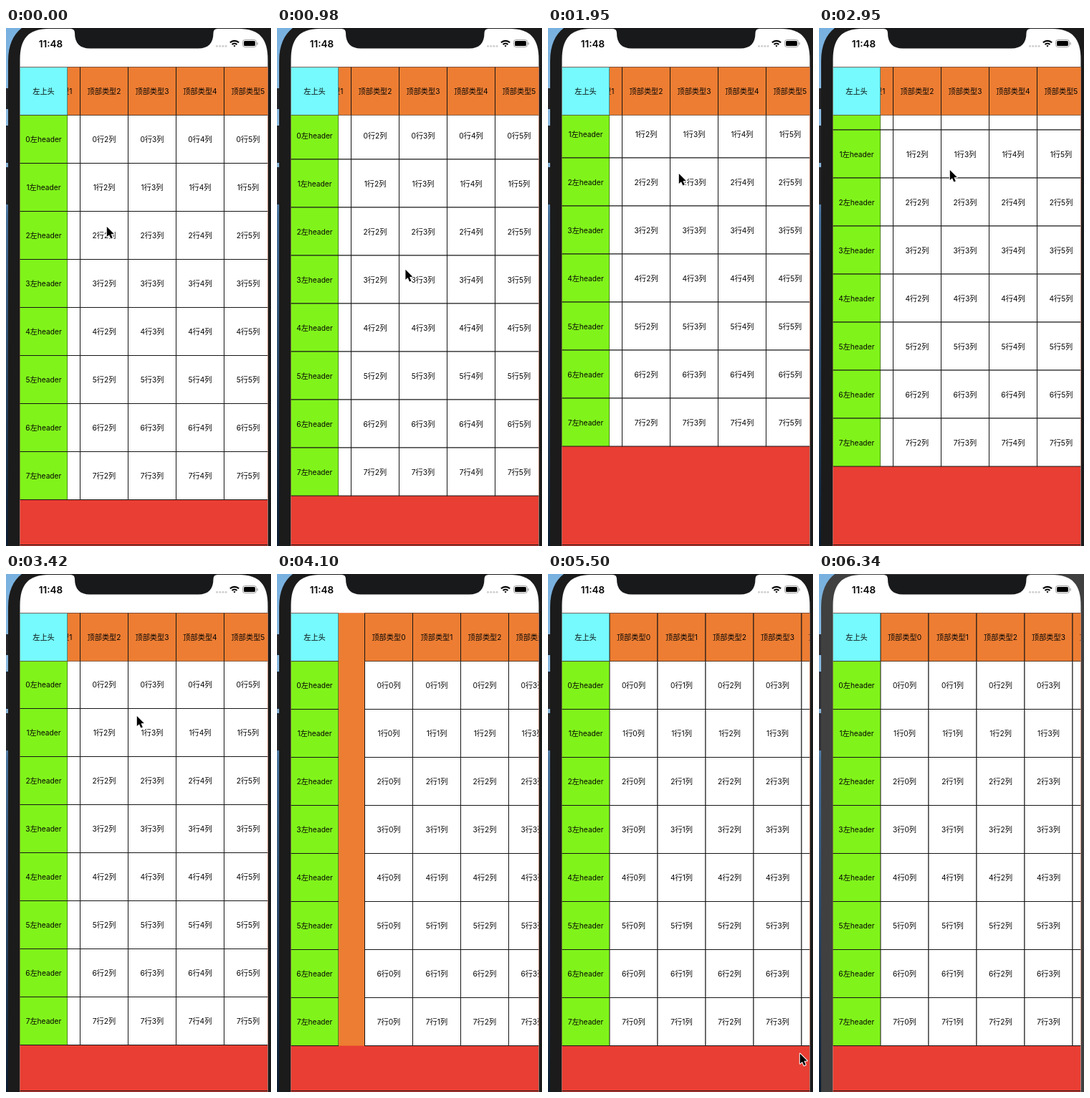
Write an HTML page with a canvas that moves like this. It is 370 px wide and 722 px high and loops after 6.44 s.

```html
<!DOCTYPE html>
<html lang="zh-CN">
<head>
<meta charset="utf-8">
<style>
html, body { margin: 0; width: 100%; height: 100%; overflow: hidden; background: #1a1a1a; }
canvas { display: block; }
</style>
</head>
<body>
<canvas id="stage" width="370" height="722"></canvas>
<script>
const ctx = document.getElementById('stage').getContext('2d');
const LOOP = 6440, W = 370, H = 722, CELL = 67, ROWS = 8, COLS = 7;
const LEFT = 19, TOP = 54.5, BODY_X = LEFT + CELL, BODY_Y = TOP + CELL;
const SCREEN_L = 19.5, SCREEN_R = 365.5;
const FONT = 'Inter, "Noto Sans CJK SC", "Noto Sans CJK", sans-serif';
const ORANGE = '#ed7d32', INK = '#161616';

const ramp = (t, from, to) => Math.min(1, Math.max(0, (t - from) / (to - from)));
const half = v => Math.round(v * 2) / 2;

// Critically damped return to rest
function bounce(size, elapsed) {
  const w = elapsed * 0.0109;
  return size * (1 + w) * Math.exp(-w);
}

function pointerAt(t) {
  if (t > 5100) {
    const away = 1 - ramp(t, 5140, 5260);
    return [351 + 46 * away ** 2, 608 - 62 * away + 118 * ramp(t, 5380, 5620)];
  }
  return [
    140 + 33 * ramp(t, 370, 450) + 9 * ramp(t, 450, 1300) + 217 * ramp(t, 3600, 4030),
    276 + 89 * ramp(t, 370, 450) - 163 * ramp(t, 770, 1950) - 5 * ramp(t, 1950, 2300)
  ];
}

// Pulled past the edge at about half the pointer's speed, then released
function scrollY(t, y) {
  if (t < 770) return 0;
  return half(t < 2950 ? 0.515 * Math.max(0, 347 - y) : bounce(77.5, t - 2825));
}

function scrollX(t) {
  return half(t < 4030 ? 116.5 - 161 * ramp(t, 3600, 4030) : -bounce(44.5, t - 4030));
}

function rect(color, x, y, w, h) {
  ctx.fillStyle = color;
  ctx.fillRect(x, y, w, h);
}

function clipped(x, y, w, h, draw) {
  ctx.save();
  ctx.beginPath();
  ctx.rect(x, y, w, h);
  ctx.clip();
  draw();
  ctx.restore();
}

function text(label, x, y, font) {
  ctx.fillStyle = '#050505';
  ctx.font = font + ' ' + FONT;
  ctx.textAlign = 'center';
  ctx.fillText(label, x, y);
}

function cell(color, x, y, label) {
  rect(color, x, y, CELL, CELL);
  ctx.strokeStyle = INK;
  ctx.lineWidth = 1;
  ctx.strokeRect(x, y, CELL, CELL);
  text(label, x + CELL / 2, y + CELL / 2 + 4, '10.2px');
}

function table(sx, sy) {
  const bodyW = SCREEN_R - BODY_X, bodyH = H - BODY_Y;
  const colX = c => BODY_X + c * CELL - sx, rowY = r => BODY_Y + r * CELL - sy;
  rect('#e93e33', LEFT, TOP, SCREEN_R - LEFT, H - TOP);
  rect(INK, LEFT, 720, SCREEN_R - LEFT, 1);
  rect(ORANGE, BODY_X, TOP, bodyW, rowY(ROWS) - TOP);

  clipped(BODY_X, BODY_Y, bodyW, bodyH, () => {
    for (let r = 0; r < ROWS; r++)
      for (let c = 0; c < COLS; c++) cell('#fff', colX(c), rowY(r), `${r}行${c}列`);
  });
  clipped(BODY_X, TOP, bodyW, CELL, () => {
    for (let c = 0; c < COLS; c++) cell(ORANGE, colX(c), TOP, '顶部类型' + c);
  });
  clipped(LEFT, BODY_Y, CELL, bodyH, () => {
    for (let r = 0; r < ROWS; r++) cell('#80f41a', LEFT, rowY(r), r + '左header');
  });
  clipped(LEFT, TOP, CELL, CELL, () => cell('#76fafd', LEFT, TOP, '左上头'));
}

function backdrop(lit) {
  const sky = ctx.createLinearGradient(0, 0, 0, H);
  sky.addColorStop(0, '#78b1e0');
  sky.addColorStop(0.25, '#8db9dc');
  sky.addColorStop(0.36, '#456f99');
  sky.addColorStop(1, '#0b1c30');
  rect(sky, 0, 0, 40, H);

  const button = lit ? '#303238' : '#242529';
  rect(button, 0, 84, 4, 29);
  rect(button, 0, 136, 4, 52);
  rect(button, 0, 194, 4, 52);

  ctx.fillStyle = lit ? '#404040' : '#1b1b1b';
  ctx.beginPath();
  ctx.moveTo(3, H);
  ctx.lineTo(3, 46);
  ctx.bezierCurveTo(3, 24, 10, 9, 22, 0);
  ctx.lineTo(W, 0);
  ctx.lineTo(W, H);
  ctx.fill();
}

function screenPath() {
  ctx.beginPath();
  ctx.moveTo(SCREEN_L, H);
  ctx.lineTo(SCREEN_L, 44);
  ctx.bezierCurveTo(SCREEN_L, 15, 31, 1, 60, 1);
  ctx.lineTo(325, 1);
  ctx.bezierCurveTo(354, 1, SCREEN_R, 15, SCREEN_R, 44);
  ctx.lineTo(SCREEN_R, H);
  ctx.closePath();
}

function notch() {
  ctx.fillStyle = '#18191b';
  ctx.beginPath();
  ctx.moveTo(90, 1);
  ctx.quadraticCurveTo(96, 1, 96, 7);
  ctx.bezierCurveTo(96, 21, 103, 28.5, 117, 28.5);
  ctx.lineTo(268.5, 28.5);
  ctx.bezierCurveTo(282.5, 28.5, 289.5, 21, 289.5, 7);
  ctx.quadraticCurveTo(289.5, 1, 295.5, 1);
  ctx.fill();
}

function statusBar() {
  text('11:48', 62.5, 26.5, '600 13.5px');

  ctx.fillStyle = '#cfcfcf';
  for (let i = 0; i < 4; i++) {
    ctx.beginPath();
    ctx.arc(294.5 + i * 4.2, 25.2, 1.5, 0, 7);
    ctx.fill();
  }

  ctx.strokeStyle = '#000';
  ctx.lineWidth = 2.2;
  for (let r = 1.1; r < 9; r += 3.75) {
    ctx.beginPath();
    ctx.arc(319, 26.4, r, -Math.PI * 0.75, -Math.PI * 0.25);
    ctx.stroke();
  }

  ctx.strokeStyle = '#9c9c9c';
  ctx.lineWidth = 1;
  ctx.beginPath();
  ctx.roundRect(330.5, 16.5, 19, 10, 3);
  ctx.stroke();
  ctx.fillStyle = '#000';
  ctx.beginPath();
  ctx.roundRect(332, 18, 16, 7, 1.6);
  ctx.fill();
  rect('#9c9c9c', 350.5, 20, 1.2, 3.5);
}

const arrow = new Path2D('M0 0V14L3.2 11.2L5.6 16.6L8 15.6L5.7 10.2L10 10Z');

function pointer(x, y) {
  ctx.save();
  ctx.translate(x + 0.8, y + 1);
  ctx.lineJoin = 'round';
  ctx.lineWidth = 2;
  ctx.strokeStyle = '#fff';
  ctx.stroke(arrow);
  ctx.fillStyle = '#000';
  ctx.fill(arrow);
  ctx.restore();
}

function draw(t) {
  const [x, y] = pointerAt(t);
  backdrop(t >= 6340);
  ctx.save();
  screenPath();
  ctx.fillStyle = '#fff';
  ctx.fill();
  ctx.clip();
  table(scrollX(t), scrollY(t, y));
  ctx.restore();
  notch();
  statusBar();
  pointer(x, y);
}

const start = performance.now();
function frame() {
  draw((performance.now() - start) % LOOP);
  requestAnimationFrame(frame);
}
frame();
</script>
</body>
</html>
```
